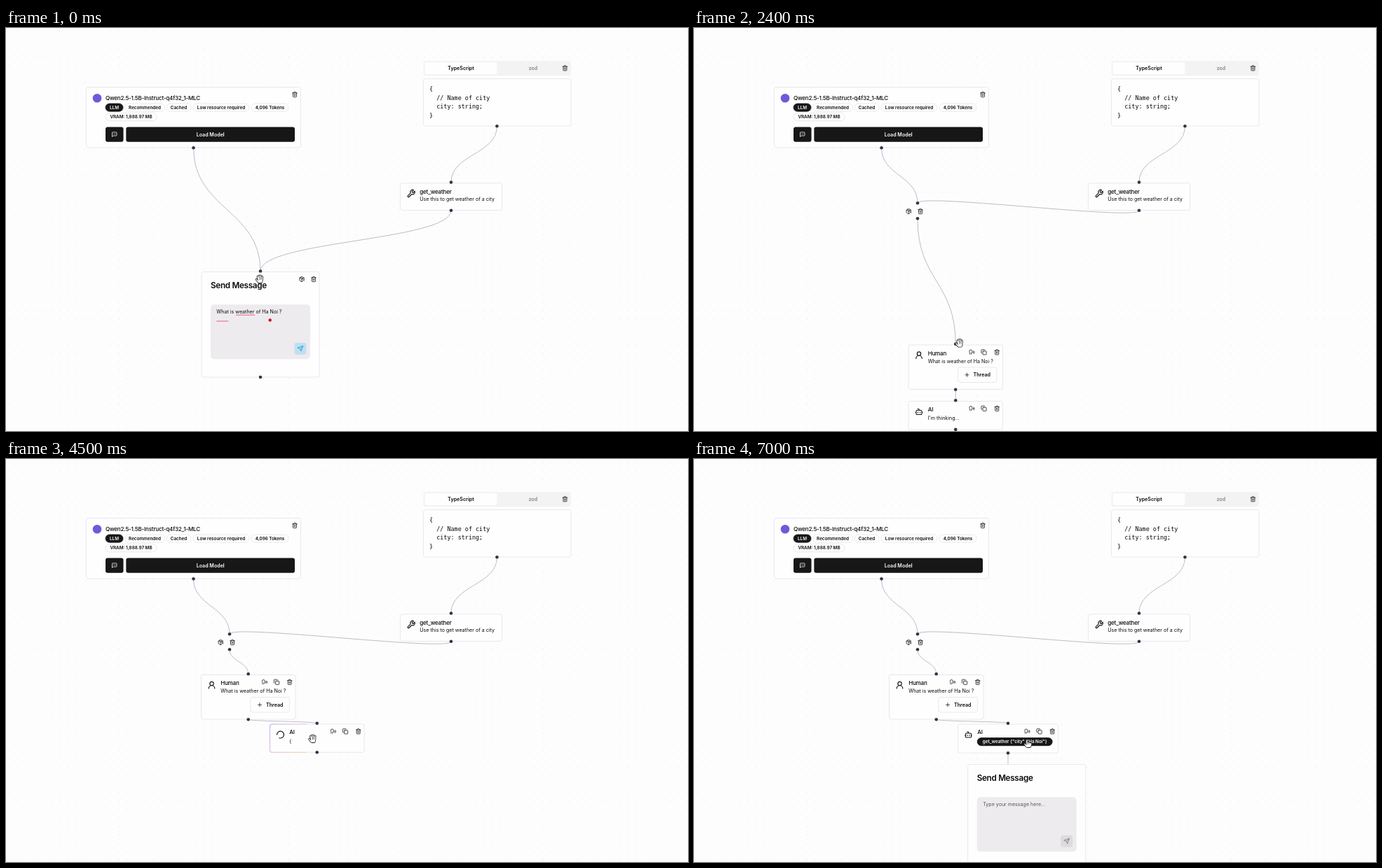
An HTML page that plays this animation: 973 by 576 pixels, repeating every 7100 ms.

```html
<!DOCTYPE html>
<html lang="en">
<head>
<meta charset="utf-8">
<title>Flow editor</title>
<style>
  html, body { margin: 0; width: 100%; height: 100%; overflow: hidden; background: #fdfdfe; }
  svg { display: block; width: 973px; height: 576px; }
  text { font: 7.1px Inter, sans-serif; fill: #0a0a0a; dominant-baseline: central; white-space: pre; }
  .title { font-size: 8.05px; font-weight: 500; letter-spacing: -.025em; }
  .head { font-size: 11.7px; font-weight: 600; letter-spacing: -.025em; }
  .strong { font-weight: 600; }
  .medium { font-weight: 500; }
  .pill { font-size: 6.3px; font-weight: 600; }
  .code { font: 8.45px "DejaVu Sans Mono", monospace; }
  .mid { text-anchor: middle; }
  .white { fill: #fff; }
  .grey { fill: #737373; }
  .hint { fill: #55555b; }
</style>
</head>
<body>
<svg viewBox="0 0 973 576" xmlns="http://www.w3.org/2000/svg">
  <defs>
    <pattern id="dots" width="12.1" height="12.1" patternUnits="userSpaceOnUse">
      <circle cx="4" cy="5" r=".5" fill="#dcdce0"/>
    </pattern>
    <linearGradient id="shine" x2="1" y2=".6">
      <stop stop-color="#a07cfe"/><stop offset=".5" stop-color="#d9a0cc"/><stop offset="1" stop-color="#ffae7b"/>
    </linearGradient>
  </defs>
  <rect width="973" height="576" fill="url(#dots)"/>
  <g id="scene"></g>
</svg>
<script>
const LOOP = 7100, STEP = 100, ZOOM = 0.605;
const INK = '#171717', LINE = '#e4e4e7';
const LINE1 = '{ "tool_calls": [ { "parameters": { "city": "Ha Noi"';
const REPLY = LINE1 + ' }, "name": "get_weather" } ] }';

const ICONS = {
  trash: 'M3 6h18M19 6v14a2 2 0 0 1-2 2H7a2 2 0 0 1-2-2V6M8 6V4a2 2 0 0 1 2-2h4a2 2 0 0 1 2 2v2M10 11v6M14 11v6',
  box: 'M21 10V8a2 2 0 0 0-1-1.7l-7-4a2 2 0 0 0-2 0l-7 4A2 2 0 0 0 3 8v8a2 2 0 0 0 1 1.7l7 4a2 2 0 0 0 2 0l2-1.1M7.5 4.3l9 5.1M3.3 7L12 12l8.7-5M12 22V12M17 13l5 5m-5 0 5-5',
  copy: 'M10 8h10a2 2 0 0 1 2 2v10a2 2 0 0 1-2 2H10a2 2 0 0 1-2-2V10a2 2 0 0 1 2-2zM4 16a2 2 0 0 1-2-2V4a2 2 0 0 1 2-2h10a2 2 0 0 1 2 2',
  speech: 'M8.8 20v-4.1l1.9.2a2.3 2.3 0 0 0 2.2-2.1V8.3A5.4 5.4 0 0 0 2 8.3c0 2.8.7 3.9 1 4.8a7 7 0 0 1 .3 6.9M19.8 17.8a7.5 7.5 0 0 0 0-10.6M17 15a3.5 3.5 0 0 0 0-5',
  wrench: 'M14.7 6.3a1 1 0 0 0 0 1.4l1.6 1.6a1 1 0 0 0 1.4 0l3.8-3.8a6 6 0 0 1-8 8l-6.9 6.9a2.1 2.1 0 0 1-3-3l6.9-6.9a6 6 0 0 1 8-8z',
  bot: 'M12 8V4H8M6 8h12a2 2 0 0 1 2 2v8a2 2 0 0 1-2 2H6a2 2 0 0 1-2-2v-8a2 2 0 0 1 2-2zM2 14h2M20 14h2M15 13v2M9 13v2',
  send: 'M22 2 11 13M22 2l-7 20-4-9-9-4z',
  chat: 'M21 15a2 2 0 0 1-2 2H7l-4 4V5a2 2 0 0 1 2-2h14a2 2 0 0 1 2 2zM8 10h.01M12 10h.01M16 10h.01',
  user: 'M17 8a5 5 0 1 1-10 0 5 5 0 0 1 10 0M20 21a8 8 0 0 0-16 0',
  plus: 'M5 12h14M12 5v14',
  loader: 'M21 12a9 9 0 1 1-6.2-8.6',
};
const HANDS = {
  open: 'M-3-3.6-1.6 1M-.9-5V1M1.3-5V1M3.5-3.6 3.2 1M-4.8.4-2 4M-1.6 1.6H3.2L2.4 4.4H-1.2z',
  closed: 'M-2.8-1.6V1M-.8-2.4V1M1.4-2.4V1M3.5-1.6V1M-4.2 1.2-2 4M-1.8 1.6H3.4L2.6 4.2H-1.2z',
  point: 'M-1.6-5V1M.5-1.4V1M2.3-1V1M4-.4V1.4M-4.4.6-2 4M-1.6 1.8H3.8L3 4.4H-.8z',
};

// Tracks: [time, x, y]
const SEND = [[0, 279, 348.5], [500, 306.5, 279], [800, 306.5, 279], [1200, 306.5, 251.5]];
const HUMAN = [[2500, 306, 453], [3200, 282.5, 324], [3600, 278.5, 308.5]];
const AI = [[4000, 306, 533.5], [4500, 376.5, 379]];
const CURSOR = [[0, 362, 359], [500, 385, 296], [800, 385, 296], [1200, 385, 268.5], [1600, 451, 370],
  [1900, 451, 370], [2500, 373, 457], [3200, 350, 328], [3600, 346, 312.5], [4000, 367, 550],
  [4500, 437.5, 400], [5600, 562, 421], [6400, 562, 421], [6900, 476.5, 407]];
const POSES = [[0, 'open'], [100, 'closed'], [1300, 'open'], [1600, 'point'], [2000, 'open'], [2600, 'closed'],
  [3200, 'open'], [4100, 'closed'], [4500, 'open'], [6700, 'point']];

function at(track, t) {
  const i = track.findIndex(k => k[0] > t);
  if (i < 0) return track.at(-1).slice(1);
  if (i === 0) return track[0].slice(1);
  const [t0, x0, y0] = track[i - 1], [t1, x1, y1] = track[i];
  const p = (t - t0) / (t1 - t0), e = p * p * (3 - 2 * p);
  return [x0 + (x1 - x0) * e, y0 + (y1 - y0) * e];
}

const pen = document.createElement('canvas').getContext('2d');
function widthOf(s) {
  pen.font = '71px Inter, sans-serif';
  return pen.measureText(s).width / 10;
}

const text = (x, y, s, cls = '') => `<text x="${x}" y="${y}" class="${cls}">${s}</text>`;
const rect = (x, y, w, h, r, fill = '#fefefe', stroke = 'none') =>
  `<rect x="${x}" y="${y}" width="${w}" height="${h}" rx="${r}" fill="${fill}" stroke="${stroke}" stroke-width=".8"/>`;
const card = (x, y, w, h) => rect(x, y, w, h, 3, '#fefefe', LINE);
const icon = (name, x, y, scale = .36, color = INK, turn = 0) =>
  `<path d="${ICONS[name]}" transform="translate(${x} ${y}) rotate(${turn}) scale(${scale}) translate(-12 -12)"
    fill="none" stroke="${color}" stroke-width="2.2" stroke-linecap="round" stroke-linejoin="round"/>`;
const handle = (x, y) => `<circle cx="${x}" cy="${y}" r="2.3" fill="#30364a"/>`;
const pill = (x, y, w, s, dark) => rect(x, y, w, 11.2, 5.6, dark ? INK : '#fefefe', dark ? INK : LINE) +
  text(x + w / 2, y + 5.6, s, 'pill mid' + (dark ? ' white' : ''));

function edge(x0, y0, x1, y1) {
  const d = y1 - y0;
  const bend = d >= 0 ? d / 2 : 6.25 * Math.sqrt(-d / ZOOM) * ZOOM;
  return `<path d="M${x0} ${y0}C${x0} ${y0 + bend} ${x1} ${y1 - bend} ${x1} ${y1}" fill="none" stroke="#b1b1b7" stroke-width=".85"/>`;
}

function fixedNodes() {
  return card(114.5, 84.5, 306, 86.5) +
    '<circle cx="130" cy="100.3" r="6.3" fill="#6a5cd8"/>' +
    text(142, 99.5, 'Qwen2.5-1.5B-Instruct-q4f32_1-MLC', 'title') + icon('trash', 412, 95) +
    pill(142, 108, 25, 'LLM', true) + pill(169.5, 108, 57, 'Recommended') + pill(229, 108, 35, 'Cached') +
    pill(267, 108, 80, 'Low resource required') + pill(350, 108, 53, '4,096 Tokens') +
    pill(142, 121.6, 73, 'VRAM: 1,888.97 MB') +
    rect(142, 141.5, 25.5, 21.3, 3, INK) + icon('chat', 154.7, 152.2, .36, '#fff') +
    rect(171.3, 141.5, 240.7, 21.3, 3, INK) + text(291.7, 152, 'Load Model', 'strong mid white') +
    handle(267.5, 171.3) +
    rect(595.5, 47, 210.5, 21, 3, '#f3f3f4') + rect(597.5, 49, 103, 17, 2.5) +
    text(649, 57.5, 'TypeScript', 'strong mid') + text(752, 57.5, 'zod', 'medium mid grey') + icon('trash', 797.5, 57.3) +
    card(595.5, 72.5, 210.5, 67.5) +
    ['{', '  // Name of city', '  city: string;', '}'].map((s, i) => text(604, 87 + i * 12.6, s, 'code')).join('') +
    handle(700.5, 140.3) +
    card(562.5, 221.7, 145, 38.8) + icon('wrench', 578, 236.7, .54) +
    text(590.3, 233.5, 'get_weather', 'title') + text(590.3, 244.7, 'Use this to get weather of a city') +
    handle(635, 220.5) + handle(635, 260.7);
}

function sendCard(x, y, message) {
  const bg = message ? '#bfe0f1' : '#dcdcdf', fg = message ? '#1f93cf' : '#77777c';
  let s = card(x, y, 168, 150.5) + text(x + 13, y + 19.7, 'Send Message', 'head') +
    rect(x + 13, y + 46.7, 142, 78, 5, '#edebee') +
    rect(x + 132.5, y + 101.3, 17, 17, 3.5, bg) + icon('send', x + 141, y + 109.8, .36, fg);
  if (!message) return s + text(x + 21.5, y + 56.8, 'Type your message here...', 'hint');
  return s + text(x + 21.3, y + 57.2, message) +
    `<path d="M${x + 49} ${y + 61.7}h27M${x + 21.3} ${y + 70.5}h17" stroke="#ee5a78" stroke-width="1"/>` +
    `<circle cx="${x + 97.7}" cy="${y + 69}" r="2.2" fill="#cf1220"/>` +
    icon('box', x + 143, y + 10.5) + icon('trash', x + 160, y + 10.5) +
    handle(x + 84, y - 1) + handle(x + 84, y + 150.5);
}

const tools = (right, y) => icon('speech', right - 44, y) + icon('copy', right - 27, y) + icon('trash', right - 8.3, y);

function humanCard(x, y) {
  return card(x, y, 134.5, 63.5) + icon('user', x + 15, y + 14.7, .53) +
    text(x + 27.7, y + 11.8, 'Human', 'title') + text(x + 27.7, y + 23, 'What is weather of Ha Noi ?') +
    tools(x + 134.5, y + 10.3) +
    rect(x + 70.5, y + 32, 55.5, 21.5, 3, '#fefefe', LINE) + icon('plus', x + 83.5, y + 42.8, .36) +
    text(x + 92.5, y + 42.8, 'Thread', 'strong') +
    handle(x + 67.2, y - 1.2) + handle(x + 67.2, y + 63.7);
}

function aiCard(x, y, t) {
  const streaming = t >= 4400 && t < 6300, done = t >= 6300;
  let w = 134.5, h = 40.3, body;
  if (streaming) {
    const typed = REPLY.slice(0, Math.max(1, Math.round(1 + (t - 4500) * 78 / 1600)));
    const rows = [typed.slice(0, LINE1.length), typed.slice(LINE1.length + 1)];
    w = Math.max(w, widthOf(rows[0]) + 37);
    if (rows[1]) h = 52;
    body = rows.map((s, i) => text(x + 27.7, y + 24 + i * 11.8, s)).join('');
  } else if (done) {
    w = 143; h = 41.2;
    body = pill(x + 27.7, y + 19.5, 107, 'get_weather {"city":"Ha Noi"}', true);
  } else body = text(x + 27.7, y + 24, "I'm thinking...");

  let shine = '';
  if (streaming) {
    const cut = x + w * (.39 + .3 * (t - 4500) / 1600);
    shine = `<path d="M${cut} ${y}H${x + 3}q-3 0-3 3v${h - 6}q0 3 3 3H${cut}" fill="none" stroke="url(#shine)" stroke-opacity=".55" stroke-width="1.1"/>`;
  }
  const mark = streaming ? icon('loader', x + 15, y + 15, .55, INK, 36 + (t - 6100) * .36) : icon('bot', x + 15, y + 15, .5);
  const svg = card(x, y, w, h) + shine + mark + text(x + 27.7, y + 11.3, 'AI', 'title') + body +
    tools(x + w, y + 10.3) + handle(x + w / 2, y - 1.2) + handle(x + w / 2, y + h);
  return { svg, mid: x + w / 2, bottom: y + h };
}

function cursor(t) {
  const [x, y] = at(CURSOR, t), pose = POSES.findLast(p => p[0] <= t)[1];
  const layer = (color, w) => `<path d="${HANDS[pose]}" fill="${color}" stroke="${color}" stroke-width="${w}" stroke-linecap="round" stroke-linejoin="round"/>`;
  return `<g transform="translate(${x} ${y})">${layer('#222', 3)}${layer('#fff', 1.4)}</g>`;
}

function scene(t) {
  const [sx, sy] = at(SEND, t), sent = t >= 1800;
  const top = sent ? 319 : sx + 84;
  let edges = edge(700.5, 140.3, 635, 220.5) + edge(267.5, 171.3, top, sy - 1) + edge(635, 260.7, top, sy - 1);
  let nodes = fixedNodes();
  if (!sent) nodes += sendCard(sx, sy, 'What is weather of Ha Noi ?');
  else {
    const [hx, hy] = at(HUMAN, t), [ax, ay] = at(AI, t);
    const ai = aiCard(ax, ay, t);
    edges += edge(319, 272.3, hx + 67.2, hy - 1.2) + edge(hx + 67.2, hy + 63.7, ai.mid, ay - 1.2);
    nodes += icon('box', 306.3, 262) + icon('trash', 323, 262) + handle(319, 250.3) + handle(319, 272.3) +
      humanCard(hx, hy) + ai.svg;
    if (t >= 6300) {
      edges += edge(ai.mid, ai.bottom, ai.mid, 437);
      nodes += sendCard(390.7, 436.5);
    }
  }
  return edges + nodes + cursor(t);
}

const stage = document.getElementById('scene');
let shown = -1;
function tick() {
  const t = Math.floor(performance.now() % LOOP / STEP) * STEP;
  if (t !== shown) stage.innerHTML = scene(shown = t);
  requestAnimationFrame(tick);
}
tick();
</script>
</body>
</html>
```
